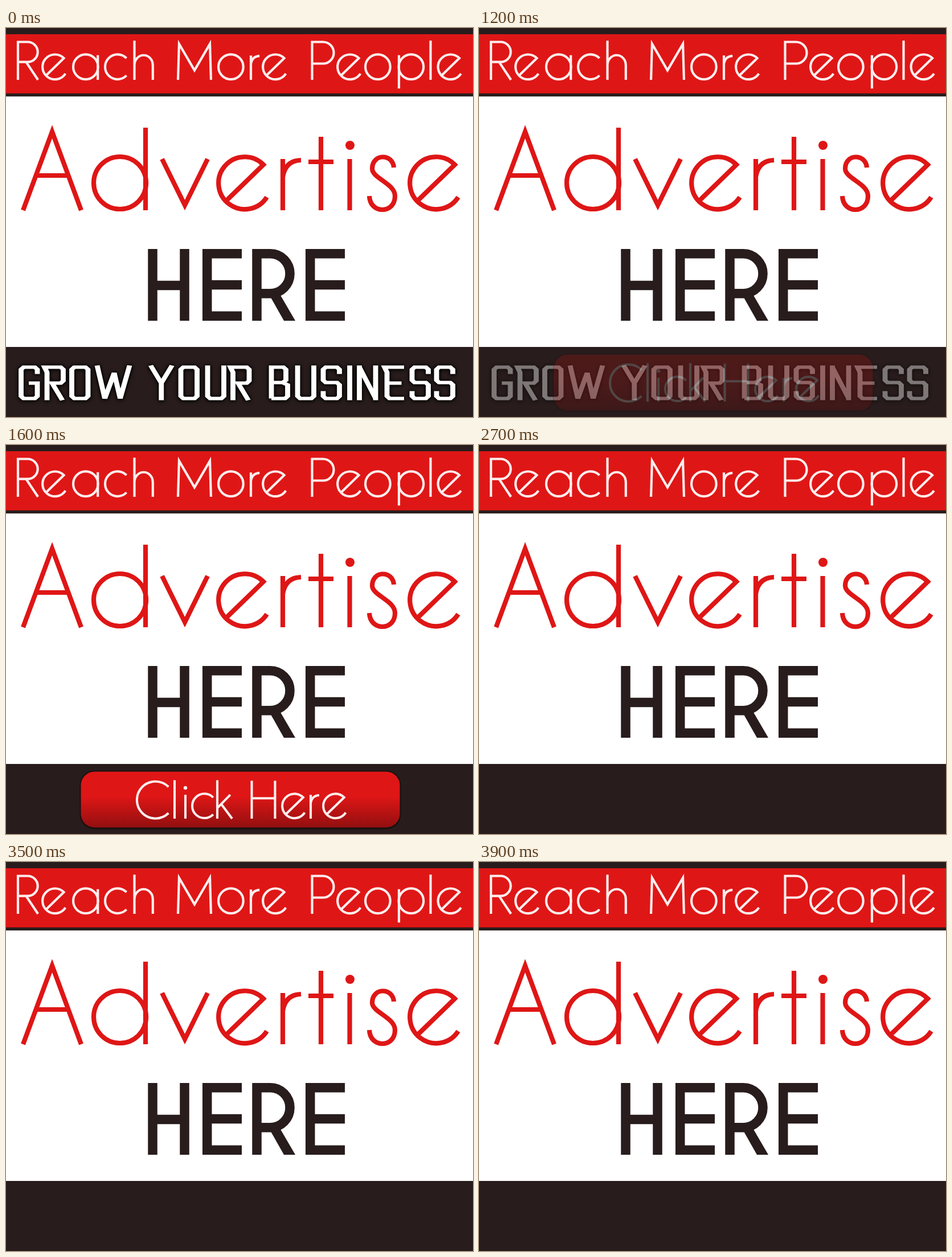
These frames come from a looping animation (820x683 px, 4.1 s). An HTML page:

```html
<!DOCTYPE html>
<html lang="en">
<head>
<meta charset="utf-8">
<title>Advertise here</title>
<style>
  html, body { margin: 0; width: 100%; height: 100%; overflow: hidden; background: #fff; }
  svg { display: block; width: 100vw; height: 100vh; }
  .line { fill: none; }
  #slogan { filter: drop-shadow(0 0 2px #000) drop-shadow(0 1px 3px #000); }
</style>
</head>
<body>
<svg id="stage" viewBox="0 0 820 683" role="img" aria-label="Reach More People. Advertise HERE. Grow your business. Click Here">
  <defs>
    <linearGradient id="glow" x1="0" y1="0" x2="0" y2="1">
      <stop offset="0" stop-color="#e01616"/>
      <stop offset=".45" stop-color="#de1616"/>
      <stop offset="1" stop-color="#930f10"/>
    </linearGradient>
  </defs>
  <rect width="820" height="683" fill="#fff"/>
  <rect width="820" height="120.2" fill="#281c1c"/>
  <rect y="10.9" width="820" height="103.9" fill="#df1616"/>
  <rect y="560" width="820" height="123" fill="#281c1c"/>
  <g id="header"></g>
  <g id="title"></g>
  <g id="here" class="line" stroke="#281c1c" stroke-width="16.5"></g>
  <g id="sloganFade"><g id="slogan"></g></g>
  <g id="button">
    <rect x="129.5" y="571.5" width="564" height="103" rx="26" fill="#1a1010"/>
    <rect x="131.5" y="573.5" width="560" height="98" rx="24" fill="url(#glow)"/>
    <g id="call"></g>
  </g>
</svg>
<script>
const $ = id => document.getElementById(id);
const LOOP = 4100;

// Thin geometric alphabet: baseline at 0, bowls of radius 46.
const BOWL = 'M0-48a46 46 0 1 1 92 0a46 46 0 1 1-92 0';
const thin = {
  A: 'M0 0L51-138L102 0M22-61H80',
  C: 'M119-120A70 70 0 1 0 119-21',
  H: 'M0 0V-143M88 0V-143M0-77H88',
  M: 'M0 0L4-133L61-35L118-133L122 0',
  P: 'M0 0V-140H40a40 40 0 0 1 0 80H0',
  R: 'M0 0V-140H36a37 37 0 0 1 0 74H0M30-66L74 0',
  a: BOWL + 'M91-91V0',
  c: 'M79-80A46 46 0 1 0 79-16',
  d: BOWL + 'M91-145V0',
  e: 'M13-16L79-80A46 46 0 1 0 85-23',
  h: 'M0 0V-145M0-54a34 37 0 0 1 68 0V0',
  i: 'M0 0V-90',
  k: 'M0 0V-145M49-90L0-40M15-55L56 0',
  l: 'M0 0V-145',
  o: BOWL,
  p: BOWL + 'M1-91V32',
  r: 'M0 0V-90M0-58Q4-87 32-88',
  s: 'M47-75C45-100 9-100 9-73C9-56 49-47 49-25C49 7 5 7 4-25',
  t: 'M22-129V0M0-85H44',
  v: 'M0-90L40-9L80-90'
};

// Angular alphabet, drawn wide so that stems are heavier than bars.
const block = {
  B: 'M0 0V-55H14L17-51V-32L13-28H0M13-28L19-24V-4L16 0H0',
  E: 'M20-55H-3L0-46V-4L3 0H20M0-27H17',
  G: 'M19-43V-51L16-55H3L0-51V-4L3 0H16L19-4V-27H9',
  I: 'M0 3V-58',
  N: 'M0 3V-58M0-55L19 0M19 3V-58',
  O: 'M3 0L0-4V-51L3-55H16L19-51V-4L16 0Z',
  R: 'M0 3V-46L-3-55H16L19-51V-31L16-27H6L18 3',
  S: 'M19-43V-51L16-55H3L0-51V-32L3-28H16L19-24V-4L16 0H3L0-4V-13',
  U: 'M0-58V-4L3 0H16L19-4V-58',
  W: 'M0-58L9 0L20-45L27 0L38-58',
  Y: 'M0-58L12.5-27V3M25-58L12.5-27'
};

// Places each letter's left stem at the matching x.
function write(id, text, font, xs, y, sx, sy, color, width) {
  const letters = text.replace(/ /g, '');
  $(id).innerHTML = xs.map((x, i) =>
    `<path class="line" d="${font[letters[i]]}" transform="translate(${x} ${y}) scale(${sx} ${sy})"
      stroke="${color}" stroke-width="${width}"/>`).join('');
}

const dot = (x, y, r, color) => `<circle cx="${x}" cy="${y}" r="${r}" fill="${color}"/>`;

write('header', 'Reach More People', thin,
  [21, 64, 118, 174, 225.5, 302, 373, 430, 451, 537.5, 582, 631, 689.5, 745.5, 758.5],
  91, .475, .475, '#ffeded', 8.8);
write('title', 'Advertise', thin,
  [30, 154, 274, 373, 486, 531, 603.5, 634, 709], 320, 1, 1, '#df1616', 8.2);
$('title').innerHTML += dot(604, 206, 8, '#df1616');
write('call', 'Click Here', thin,
  [230, 296, 315, 327, 371, 431.5, 485, 535, 557], 656, .465, .465, '#ffeded', 8.8);
$('call').innerHTML += dot(315, 602, 3.2, '#ffeded');
write('slogan', 'GROW YOUR BUSINESS', block,
  [26.5, 72, 115.5, 160, 254, 307, 354, 398.5, 466, 512, 557, 603.5, 620.5, 669, 713, 756],
  650.5, 1.5, 1, '#fff', 5.9);

const boldE = x => `<path d="M${x + 69} 396.2H${x + 8.2}V505.8H${x + 69}M${x + 8} 451H${x + 69}"/>`;
$('here').innerHTML = boldE(345) + boldE(526) +
  '<path d="M257.5 388V514M313.5 388V514M257 452H313"/>' +
  '<path d="M440.5 514V396.2H464a34.5 35 0 0 1 0 70H440"/>' +
  '<path d="M462 468L488 514H508L480 466Z" fill="#281c1c" stroke="none"/>';

const clamp = v => Math.max(0, Math.min(1, v));

function draw(t) {
  // Cross-fade in tenths of a second, the button one step behind.
  const step = Math.floor((t - 1000) / 100);
  const blinkOff = t >= 2700 && Math.floor((t - 2700) / 200) % 2 === 0;
  $('sloganFade').setAttribute('opacity', clamp(1 - (step + 1) * .2));
  $('button').setAttribute('opacity', blinkOff ? 0 : clamp((step - 1) * .2));
}

const start = performance.now();
function tick() {
  draw((performance.now() - start) % LOOP);
  requestAnimationFrame(tick);
}
tick();
</script>
</body>
</html>
```
